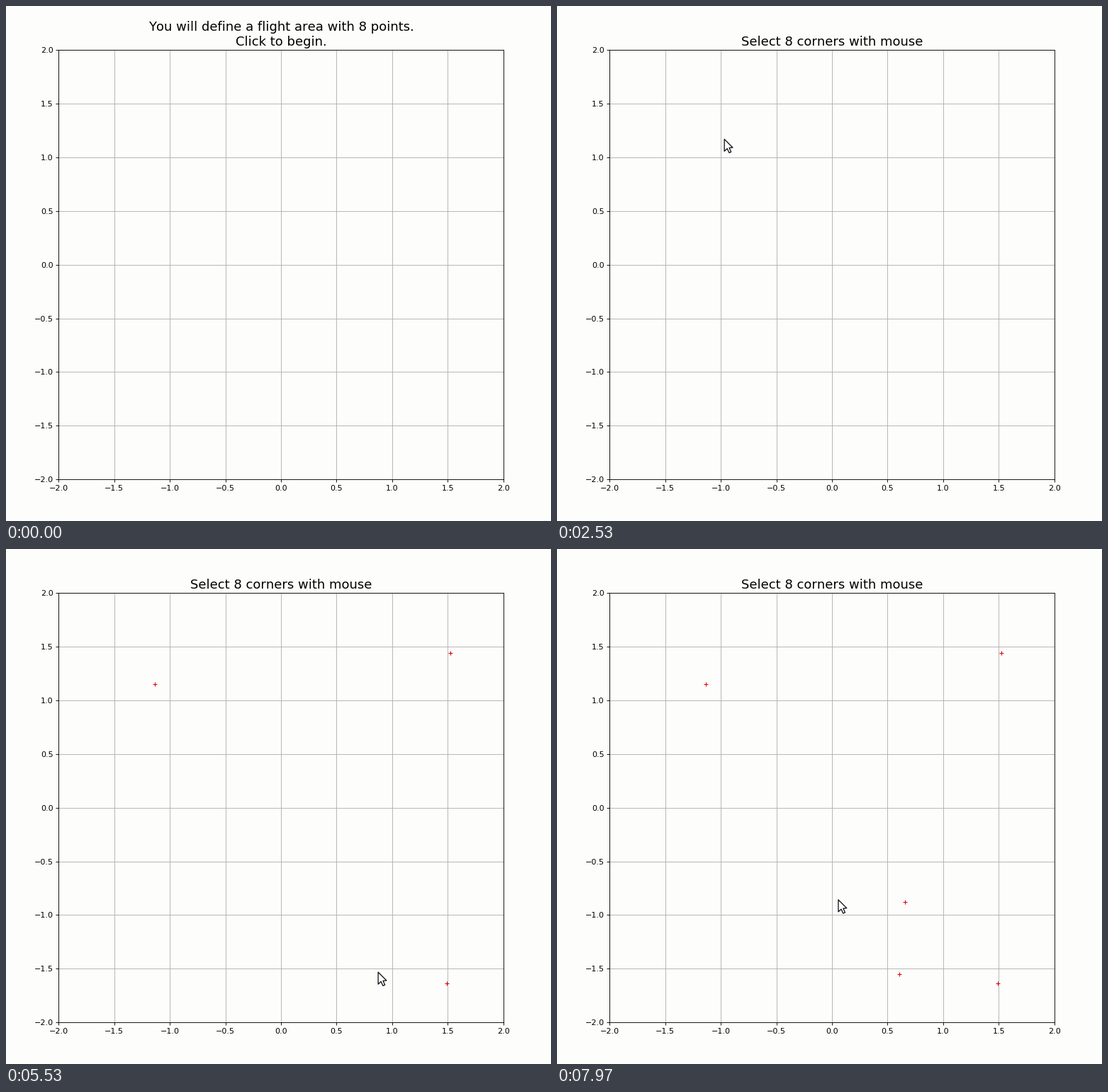
A matplotlib script for the animation above (8000 ms loop, 769 by 728 pixels).

```python
import numpy as np
import matplotlib.pyplot as plt
from matplotlib.animation import FuncAnimation
from matplotlib.patches import Polygon

W, H, DPI = 769, 728, 80
INTERVAL, FRAMES = 32, 250
BACKGROUND = "#fdfdfc"
INTRO = "You will define a flight area with 8 points.\nClick to begin."
PROMPT = "Select 8 corners with mouse"
TITLE_SWITCH = 1560

MOVE = 550         # ms per cursor move
CLICK_DELAY = 270  # ms from reaching a corner until its mark shows
BOW = 0.23         # sag of a move, relative to its horizontal length

# Cursor stops in pixels from the top left: arrival (ms), x, y, clicked.
STOPS = np.array([
    (900, 368, 204, 0),
    (2670, 210, 190, 1),
    (3617, 639, 144, 0),
    (4100, 627, 146, 1),
    (4920, 622, 613, 1),
    (5705, 483, 600, 1),
    (6500, 519, 499, 0),
    (7100, 491, 498, 1),
    (8100, 381, 498, 0),
])
ARRIVE = STOPS[:, 0]
STEPS = np.diff(STOPS[:, 1:3], axis=0, prepend=[(620, 600)])
CORNERS = STOPS[STOPS[:, 3] == 1]

ARROW = np.array([(0, 1), (0, 18), (4, 14.3), (6.8, 20.2),
                  (9.5, 19), (6.9, 13.2), (11.8, 12.8)])


def cursor_at(t):
    """Sum of all eased moves so far, each bent into a shallow arc."""
    u = np.clip((t - ARRIVE) / MOVE + 1, 0, 1)
    ease = u * u * (3 - 2 * u)
    x, y = STOPS[0, 1:3] - STEPS[0] + ease @ STEPS
    return x, y + BOW * np.sum(STEPS[:, 0] * ease * (1 - ease))


plt.rcParams.update({"font.family": "DejaVu Sans", "text.kerning_factor": 6})
fig = plt.figure(figsize=(W / DPI, H / DPI), dpi=DPI, facecolor=BACKGROUND)

left, right, top, bottom = 74.4, 701.6, 62.4, 669.1
ax = fig.add_axes([left / W, 1 - bottom / H, (right - left) / W, (bottom - top) / H],
                  facecolor=BACKGROUND)
ticks = np.arange(-2, 2.1, 0.5)
ax.set(xlim=(-2, 2), ylim=(-2, 2), xticks=ticks, yticks=ticks)
ax.grid(True)
title = ax.set_title(INTRO, fontsize=16.25)

# Pixel space over the whole stage, origin at the top left.
stage = fig.add_axes([0, 0, 1, 1])
stage.axis("off")
stage.set(xlim=(0, W), ylim=(H, 0))
marks, = stage.plot([], [], "+", color="#e00808", markersize=6)
cursor = Polygon(ARROW, closed=True, facecolor="white", edgecolor="#0c0c14",
                 linewidth=1.15, joinstyle="round", zorder=5)
stage.add_patch(cursor)


def update(frame):
    t = frame * INTERVAL
    title.set_text(INTRO if t < TITLE_SWITCH else PROMPT)
    shown = CORNERS[CORNERS[:, 0] + CLICK_DELAY <= t]
    marks.set_data(shown[:, 1], shown[:, 2] + 0.5)
    cursor.set_visible(t >= ARRIVE[0] - MOVE)
    cursor.set_xy(ARROW + cursor_at(t))
    return title, marks, cursor


anim = FuncAnimation(fig, update, frames=FRAMES, interval=INTERVAL,
                     repeat=True, repeat_delay=0)
plt.show()
```
